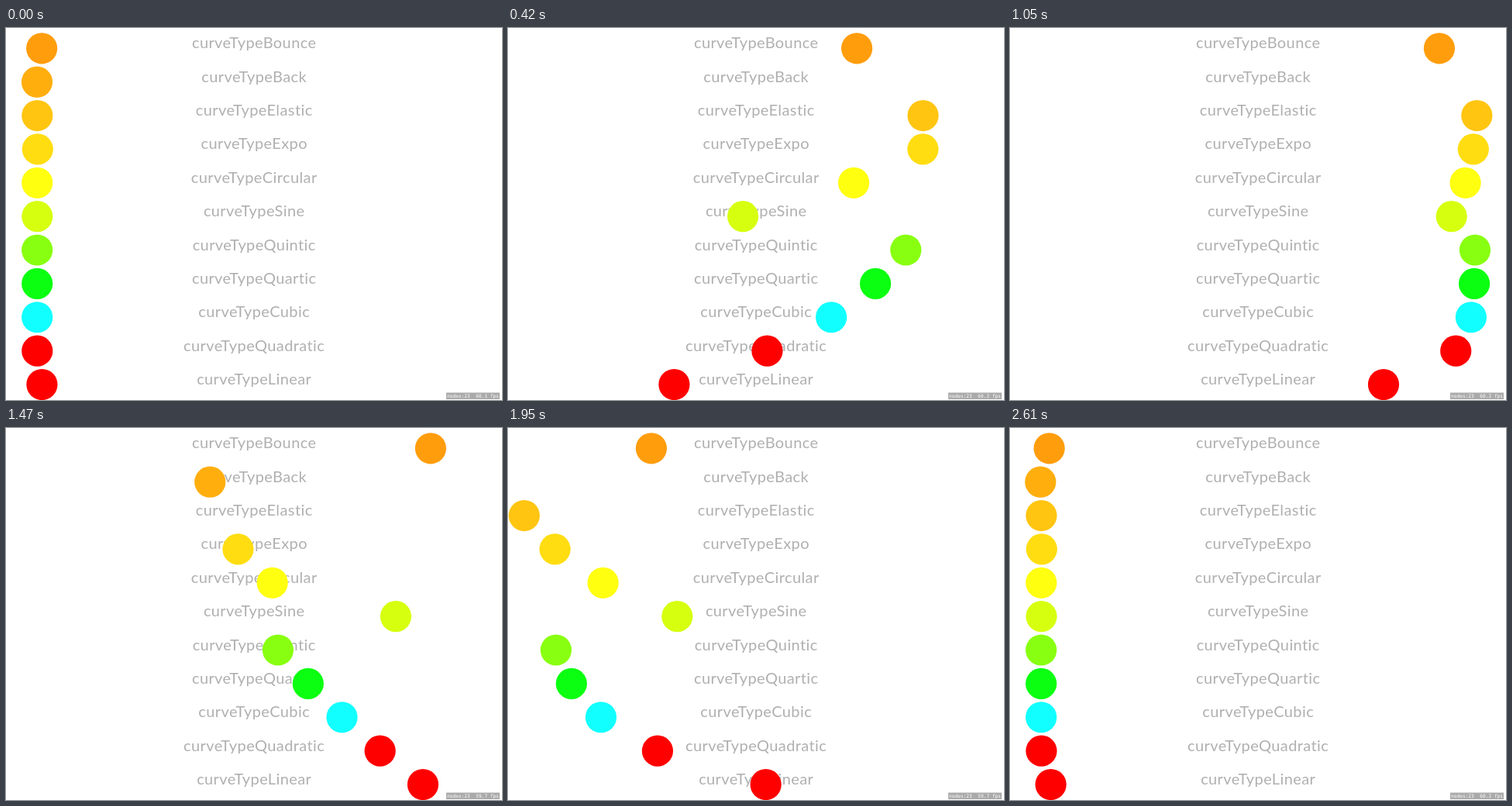
Animation of 640 by 480 pixels, one loop 2640 ms. Source, as an HTML page:

```html
<!DOCTYPE html>
<html lang="en">
<head>
<meta charset="utf-8">
<title>Easing curves</title>
<style>
html, body { margin: 0; width: 100%; height: 100%; overflow: hidden; background: #fff; }
svg { display: block; width: 100vw; height: 100vh; }
.label { font: 400 20px Lato, sans-serif; letter-spacing: .4px; fill: #b0b0b0; text-anchor: middle; }
.stats { font: 6.2px "DejaVu Sans Mono", monospace; fill: #fff; white-space: pre; }
</style>
</head>
<body>
<svg viewBox="0 0 640 480">
  <g id="labels"></g>
  <g id="balls"></g>
  <rect x="568" y="470.5" width="69" height="8.5" fill="#aaa"/>
  <text id="stats" class="stats" x="569" y="477"></text>
</svg>
<script>
const { sin, sqrt, pow, PI } = Math;
const LOOP = 2640, STEP = 30, LEG = 90;
const LEFT = 40.2, RIGHT = 600.2, TOP = 26.3, ROW = 43.37;

const power = n => p => 1 - pow(1 - p, n);

function bounce(p) {
  if (p < 4 / 11) return 121 * p * p / 16;
  if (p < 8 / 11) return 363 / 40 * p * p - 9.9 * p + 3.4;
  if (p < 0.9) return (4356 * p * p / 361) - 35442 / 1805 * p + 16061 / 1805;
  return 10.8 * p * p - 20.52 * p + 10.72;
}

function back(p) {
  const f = 1 - p;
  return 1 - (f * f * f - f * sin(f * PI));
}

const elastic = p => 1 + sin(-6.5 * PI * (p + 1)) * pow(2, -10 * p);

const rows = [
  ["Bounce", "#ff9d0c", bounce],
  ["Back", "#ffae0d", back],
  ["Elastic", "#ffc511", elastic],
  ["Expo", "#ffdd11", p => 1 - pow(2, -10 * p)],
  ["Circular", "#ffff10", p => sqrt((2 - p) * p)],
  ["Sine", "#d6ff10", p => sin(p * PI / 2)],
  ["Quintic", "#88ff10", power(5)],
  ["Quartic", "#0aff10", power(4)],
  ["Cubic", "#11ffff", power(3)],
  ["Quadratic", "#ff0000", power(2)],
  ["Linear", "#ff0000", p => p]
];

function add(parent, tag, attrs) {
  const el = document.createElementNS("http://www.w3.org/2000/svg", tag);
  for (const key in attrs) el.setAttribute(key, attrs[key]);
  return document.getElementById(parent).appendChild(el);
}

const balls = rows.map(([name, fill, ease], i) => {
  const y = TOP + i * ROW;
  add("labels", "text", { class: "label", x: 320.2, y }).textContent = "curveType" + name;
  return { ease, el: add("balls", "circle", { cy: y, r: 20.1, fill }) };
});

const stats = document.getElementById("stats");

function fps(t) {
  if (t < 300) return "60.1";
  return t >= 1170 && t < 2040 ? "59.7" : "60.2";
}

function draw(t) {
  // The balls advance in whole 1/90 ticks, about two per step.
  const tick = Math.floor(Math.floor(t / STEP) * 2.057 - 0.2);
  const n = (tick + 2 * LEG) % (2 * LEG);
  const p = n % LEG / LEG;
  const [from, to] = n < LEG ? [LEFT, RIGHT] : [RIGHT, LEFT];
  for (const { ease, el } of balls) {
    el.setAttribute("cx", (from + (to - from) * ease(p)).toFixed(2));
  }
  stats.textContent = "nodes:23  " + fps(t) + " fps";
}

const start = performance.now();
function frame() {
  draw((performance.now() - start) % LOOP);
  requestAnimationFrame(frame);
}
draw(0);
requestAnimationFrame(frame);
</script>
</body>
</html>
```
